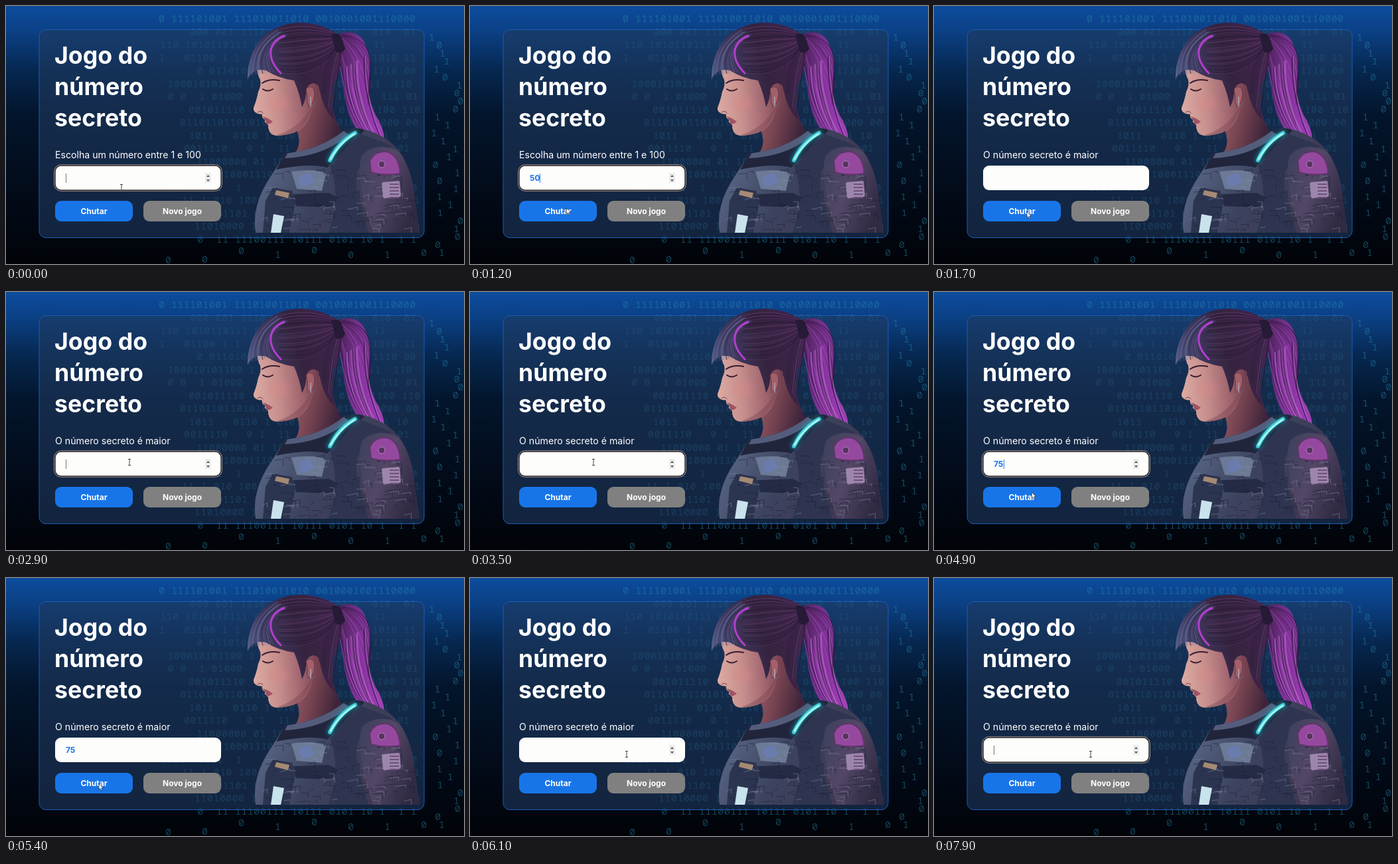
Animation of 690x388 px, one loop 8 s. Source, as an HTML page:

```html
<!DOCTYPE html>
<html lang="pt-BR">
<head>
<meta charset="utf-8">
<title>Jogo do número secreto</title>
<style>
  html, body { margin: 0; width: 100%; height: 100%; overflow: hidden; background: #020a18; }
  svg { display: block; width: 690px; height: 388px; }
  text { font-family: Inter, sans-serif; fill: #fff; white-space: pre; }
  .bits text { font: 15px "Noto Sans Mono", monospace; letter-spacing: .45px; fill: #2b8fb4; }
  .title text { font-size: 35.7px; font-weight: 700; }
  .btn { font-size: 12px; font-weight: 700; text-anchor: middle; }
  .lines { fill: none; stroke-linecap: round; stroke-linejoin: round; }
</style>
</head>
<body>
<svg viewBox="0 0 690 388">
  <defs>
    <linearGradient id="sky" x2="0" y2="1">
      <stop offset="0" stop-color="#0d4c9e"/><stop offset=".1" stop-color="#0b4084"/>
      <stop offset=".25" stop-color="#06274f"/><stop offset=".42" stop-color="#03152c"/>
      <stop offset=".75" stop-color="#020a17"/><stop offset="1" stop-color="#010308"/>
    </linearGradient>
    <linearGradient id="skin" x1="0" y1=".5" x2="1" y2=".4">
      <stop offset="0" stop-color="#dcaaa2"/><stop offset=".35" stop-color="#c78f8d"/>
      <stop offset=".7" stop-color="#a0656f"/><stop offset="1" stop-color="#6f3c4c"/>
    </linearGradient>
    <linearGradient id="neck" x1="0" x2="1" y2=".3">
      <stop offset="0" stop-color="#9a606a"/><stop offset=".5" stop-color="#74424f"/>
      <stop offset="1" stop-color="#3d243a"/>
    </linearGradient>
    <linearGradient id="hair" x1="0" y1=".6" x2="1" y2=".3">
      <stop offset="0" stop-color="#5a6690"/><stop offset=".22" stop-color="#403a60"/>
      <stop offset=".55" stop-color="#35233f"/><stop offset="1" stop-color="#43244e"/>
    </linearGradient>
    <linearGradient id="tail" x1="0" x2="1" y2=".2">
      <stop offset="0" stop-color="#40204e"/><stop offset=".45" stop-color="#76318c"/>
      <stop offset="1" stop-color="#9b42b4"/>
    </linearGradient>
    <linearGradient id="suit" x1="0" x2="1" y2=".35">
      <stop offset="0" stop-color="#8497b8"/><stop offset=".25" stop-color="#54617f"/>
      <stop offset=".55" stop-color="#3c435f"/><stop offset="1" stop-color="#41364f"/>
    </linearGradient>
    <linearGradient id="arm" x1="0" x2="1" y2=".5">
      <stop offset="0" stop-color="#3b405c"/><stop offset=".5" stop-color="#534766"/>
      <stop offset="1" stop-color="#302a43"/>
    </linearGradient>
    <filter id="glow" x="-60%" y="-60%" width="220%" height="220%"><feGaussianBlur stdDeviation="3"/></filter>
    <clipPath id="body"><path d="M376 341Q370 300 397 259L421 222Q475 215 508 188Q530 178 560 193Q610 215 616 292L623 341Z"/></clipPath>
  </defs>

  <rect width="690" height="388" fill="url(#sky)"/>
  <g class="bits" id="bits" opacity=".45"></g>
  <rect x="50" y="35.5" width="580" height="313" rx="10" fill="#1e3a60" fill-opacity=".6" stroke="#1c5db0"/>

  <!-- ponytail -->
  <path fill="url(#tail)" d="M495 45C515 34 536 40 542 60C553 88 544 108 547 132Q550 155 562 173Q571 190 571 211Q556 196 546 203Q528 191 518 166Q508 140 506 95Z"/>
  <g class="lines" id="tailLines"></g>

  <!-- neck and face -->
  <path fill="url(#neck)" d="M437 184Q462 166 466 125L492 130Q489 164 507 191Q488 216 435 222Q447 206 437 184Z"/>
  <path fill="url(#skin)" d="M377 84Q378 102 383 111Q385 119 380 129Q378 140 373 153Q372 159 379 162L386 163Q384 168 391 171Q388 174 392 176Q396 179 395 183Q397 194 407 195Q425 195 440 188Q456 179 462 155Q475 140 471 118L450 78L400 66Z"/>
  <path fill="#79414f" opacity=".4" d="M408 194Q440 185 461 151Q452 182 438 189Q423 196 408 194Z"/>
  <ellipse cx="410" cy="146" rx="15" ry="11" fill="#d98786" opacity=".35" filter="url(#glow)"/>
  <path fill="#a05462" d="M386 166Q393 167 402 174Q396 179 392 177L391 171Z"/>
  <g class="lines" stroke="#3a1d30">
    <path stroke-width="2" d="M386 116Q396 109 412 112"/>
    <path stroke-width="2" d="M387 125Q394 130 402 125"/>
    <path stroke="#743a49" d="M379 160Q384 156 387 161"/>
  </g>
  <path fill="#a26069" stroke="#633649" d="M452 124Q463 117 465 130Q465 147 456 151Q452 145 454 137Z"/>
  <path class="lines" stroke="#b1c9dc" d="M459 137v14"/>

  <!-- hair -->
  <path fill="url(#hair)" d="M364 110C363 82 376 47 407 33C436 19 477 25 500 43L506 58Q508 90 494 118Q488 143 496 173Q476 155 472 121Q461 110 452 125Q453 140 446 152Q442 130 434 112Q408 108 392 97Q372 92 364 110Z"/>
  <g class="lines" id="hairLines"></g>
  <path class="lines" stroke="#b53ed0" stroke-width="3" d="M419 45C394 55 392 79 414 101"/>
  <path fill="#261a36" d="M490 43Q500 39 505 46L511 64Q505 73 497 69Z"/>

  <!-- suit -->
  <g clip-path="url(#body)">
    <rect x="365" y="175" width="262" height="170" fill="url(#suit)"/>
    <path fill="#20253b" d="M420 222Q474 214 524 179L540 187L484 243Q459 236 407 246Z"/>
    <path fill="#535d7b" d="M425 220Q470 216 509 188L516 193Q481 226 420 229Z"/>
    <path fill="#2f3550" d="M488 240L531 191L583 211Q519 225 529 277L546 341H486Q505 285 488 240Z"/>
    <path fill="url(#arm)" d="M536 224Q560 201 596 221Q615 263 624 341H553Q525 260 536 224Z"/>
    <path fill="#2c3550" d="M391 293L402 273L431 278L436 296L427 341H387Z"/>
    <path fill="#6c7995" d="M430 249Q467 244 482 252L476 278L438 275Z"/>
    <path fill="#252b44" d="M433 283L486 281L500 288L491 303L437 301Z"/>
    <g class="lines" id="seams"></g>
  </g>
  <g class="lines">
    <path stroke="#18b9c9" stroke-width="9" opacity=".5" filter="url(#glow)" d="M526 191Q501 204 488 232"/>
    <path stroke="#3bc9d4" stroke-width="6" d="M526 191Q501 204 488 232"/>
    <path stroke="#a5f4f0" stroke-width="3" d="M525 192Q502 206 489 230"/>
  </g>
  <path fill="#94499f" stroke="#5f3469" stroke-width="2" d="M548 234Q554 218 573 219Q592 223 594 252Q568 256 550 250Z"/>
  <circle cx="566" cy="238" r="5" fill="#57345f" stroke="#c27bc4"/>
  <rect x="567" y="264" width="27" height="24" rx="2" fill="#9c86ac" transform="rotate(-5 580 276)"/>
  <path stroke="#705078" stroke-width="14" stroke-dasharray="2 3" d="M585 267V289"/>
  <rect x="442" y="253" width="20" height="17" rx="3" fill="#6a7cae" transform="rotate(-17 452 261)"/>
  <path fill="#a58a74" d="M407 277L427 281L425 289L405 284Z"/>
  <path fill="#c8e3ec" d="M403 313L419 316L414 341H399Z"/>

  <!-- form -->
  <g class="title">
    <text x="73" y="87">Jogo do</text><text x="73" y="134">número</text><text x="73" y="181">secreto</text>
  </g>
  <text id="label" x="74" y="229" font-size="14.15"></text>
  <rect x="74" y="240" width="250" height="37" rx="9" fill="#fdfdfc"/>
  <g id="ring" fill="none">
    <rect x="72.7" y="238.8" width="252.6" height="39.4" rx="10" stroke="#a9a29c"/>
    <rect x="74" y="240" width="250" height="37" rx="9" stroke="#3b322e" stroke-width="1.5"/>
  </g>
  <text id="value" x="90" y="263" font-size="12" font-weight="700" style="fill:#1875e8"></text>
  <rect id="caret" y="252" width="1" height="14"/>
  <g id="spin">
    <rect x="300" y="251" width="9" height="15" fill="#ececec"/>
    <path fill="#555" d="M302 257L304.5 254L307 257ZM302 261L304.5 264L307 261Z"/>
  </g>
  <rect x="74" y="293" width="117" height="31" rx="9" fill="#1875e8"/>
  <rect x="207" y="293" width="117" height="31" rx="9" fill="#808080"/>
  <text class="btn" x="132.5" y="313">Chutar</text>
  <text class="btn" x="265.5" y="313">Novo jogo</text>
  <path id="beam" fill="none" stroke="#444" d="M-2 -4.5H2M0 -4V4M-2 4.5H2"/>
  <path id="arrow" fill="#fff" stroke="#222" stroke-width=".7" d="M0 0V9L2.1 7.1L3.6 10.4L5.1 9.7L3.7 6.5H6.5Z"/>
</svg>

<script>
const $ = id => document.getElementById(id);

let seed = 7;
const rnd = (lo = 0, hi = 1) => lo + (hi - lo) * (seed = seed * 16807 % 2147483647) / 2147483647;
const pick = list => list[Math.floor(rnd(0, list.length))];

function add(parent, tag, attrs, content = "") {
  const el = document.createElementNS("http://www.w3.org/2000/svg", tag);
  for (const key in attrs) el.setAttribute(key, attrs[key]);
  el.textContent = content;
  $(parent).append(el);
}

// Background digits: full rows, then loose ones to the right and below
const bit = () => pick("01");
for (let y = 24; y < 360; y += 19.5) {
  const x = rnd(230, 290), count = Math.floor((625 - x) / 9.45);
  const row = Array.from({ length: count }, () => rnd() < .25 ? " " : bit()).join("");
  add("bits", "text", { x, y }, row);
}
for (let y = 52; y < 388; y += 12) add("bits", "text", { x: rnd(636, 682), y }, bit());
for (let x = 240; x < 640; x += 55) add("bits", "text", { x, y: rnd(372, 388) }, bit());

// Strands interpolate between two quadratic curves
function strands(parent, from, to, count, colors) {
  for (let i = 0; i < count; i++) {
    const k = (i + rnd()) / count;
    const [x, y, ...rest] = from.map((v, j) => v + (to[j] - v) * k);
    add(parent, "path", { d: `M${x} ${y}Q${rest}`, stroke: pick(colors), "stroke-width": rnd(.5, 1.6), opacity: .5 });
  }
}
const dark = ["#25192f", "#5b3a66", "#6b4776", "#302440"];
strands("hairLines", [407, 35, 368, 60, 366, 104], [425, 45, 382, 68, 404, 99], 18, ["#6d78a4", "#37345d", "#474572"]);
strands("hairLines", [411, 33, 460, 18, 499, 44], [412, 101, 475, 112, 502, 58], 34, dark);
strands("hairLines", [498, 57, 469, 85, 475, 126], [505, 61, 503, 100, 492, 166], 12, dark);
strands("tailLines", [499, 55, 506, 150, 545, 200], [508, 43, 568, 45, 546, 130], 20, ["#2f183f", "#b456c8", "#53205f"]);
strands("tailLines", [507, 95, 508, 160, 546, 199], [542, 75, 540, 140, 569, 205], 26, ["#2f183f", "#b456c8", "#9c36b5", "#cf78dc"]);

// Seams of the suit
for (let i = 0; i < 110; i++) {
  const d = `M${rnd(385, 610)} ${rnd(245, 338)}l${rnd(4, 18)} ${rnd(-4, 1)}v${rnd(0, 10)}`;
  add("seams", "path", { d, stroke: pick(["#191d30", "#8089a6", "#20243a"]), opacity: .55 });
}

const LOOP = 8000, BLINK = 500, KEY = 200, MOVE = 400;
const BUTTON = [140, 309.5];
const turns = [
  { focus: 0, type: 800, word: "50", blur: 1400, clear: 1500 },
  { focus: 2700, type: 3700, word: "75", blur: 5100, clear: 5500 },
  { focus: 6500, type: LOOP, word: "", blur: LOOP, clear: LOOP }
];
const home = [174, 273];
const moves = [
  { at: 900, to: BUTTON }, { at: 2200, to: [186, 256] },
  { at: 4600, to: BUTTON }, { at: 5600, to: [236, 265] }
];

function pointer(t) {
  return moves.reduce((pos, { at, to }) => {
    const u = Math.min(1, Math.max(0, (t - at) / MOVE)), ease = u * u * (3 - 2 * u);
    return pos.map((v, i) => v + (to[i] - v) * ease);
  }, home);
}

function field(t) {
  const turn = turns.findLast(s => s.focus <= t);
  const typed = t < turn.type ? 0 : Math.min(turn.word.length, 1 + Math.floor((t - turn.type) / KEY));
  const lastInput = typed ? turn.type + (typed - 1) * KEY : turn.focus;
  const focus = t < turn.blur;
  return {
    value: t < turn.clear ? turn.word.slice(0, typed) : "",
    focus,
    caret: focus && Math.floor((t - lastInput) / BLINK) % 2 === 0
  };
}

const show = (id, on) => $(id).setAttribute("visibility", on ? "visible" : "hidden");

function draw(t) {
  const { value, focus, caret } = field(t);
  const [x, y] = pointer(t);
  const over = y > 240 && y < 277;
  $("label").textContent = t < turns[0].clear ? "Escolha um número entre 1 e 100" : "O número secreto é maior";
  $("value").textContent = value;
  $("caret").setAttribute("x", 90 + value.length * 7.4);
  $("caret").setAttribute("fill", value ? "#1875e8" : "#777");
  show("ring", focus);
  show("caret", caret);
  show("spin", focus || over);
  show("beam", over);
  show("arrow", !over);
  for (const id of ["beam", "arrow"]) $(id).setAttribute("transform", `translate(${x} ${y})`);
}

function tick() {
  draw(Math.floor(performance.now() % LOOP / 100) * 100);
  requestAnimationFrame(tick);
}
tick();
</script>
</body>
</html>
```
